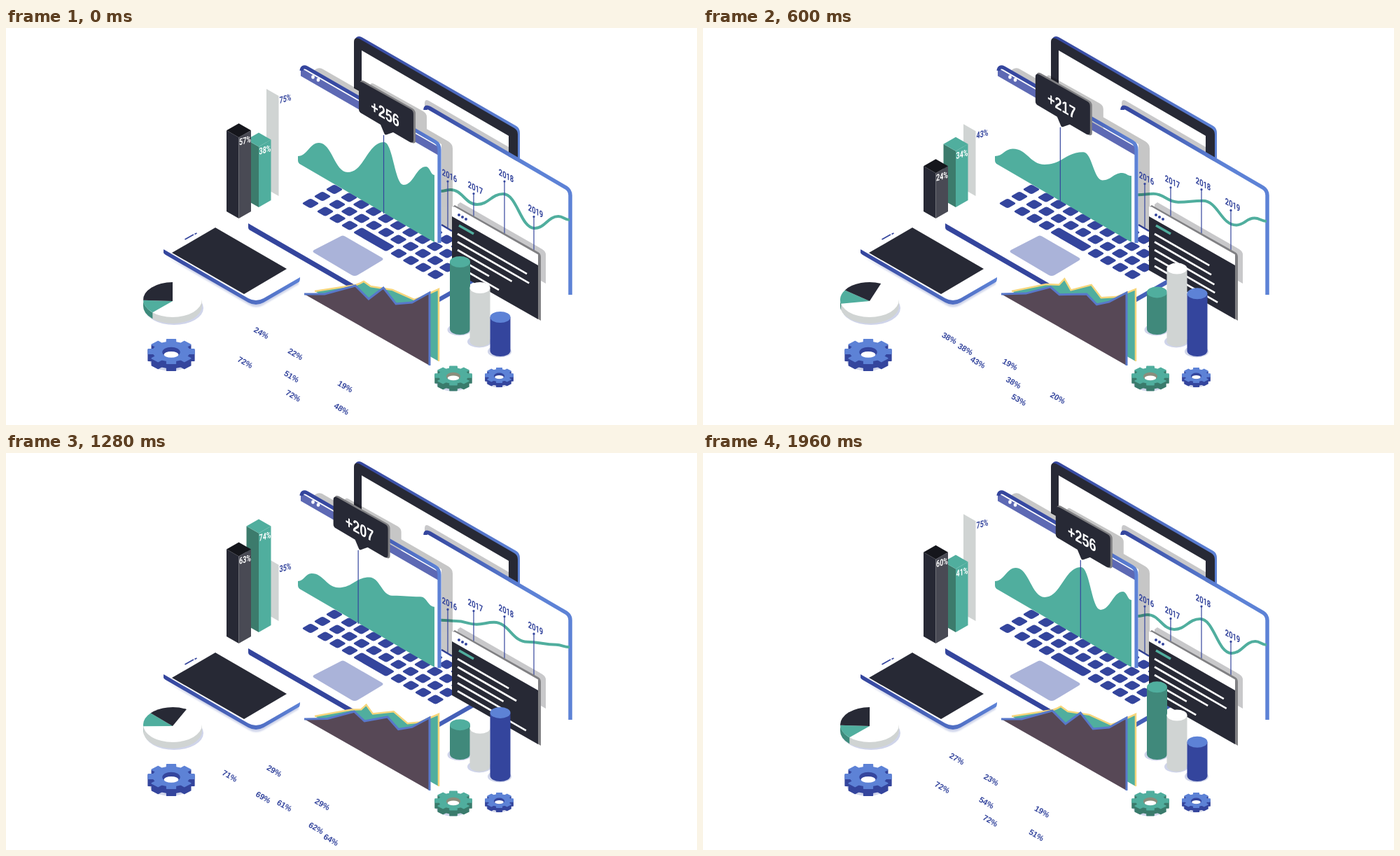
An HTML page for the animation above (2000 ms loop, 987 by 567 pixels).

```html
<!DOCTYPE html>
<html lang="en">
<head>
<meta charset="utf-8">
<title>Isometric dashboard</title>
<style>
  html, body { margin: 0; width: 100%; height: 100%; overflow: hidden; background: #fff; }
  svg { display: block; width: 100%; height: 100%; }
  text { font: 700 13px Roboto, "Liberation Sans", sans-serif; text-anchor: middle; }
  #floor text, #tipText { font-family: "Liberation Sans", Arial, sans-serif; }
  #tipText { font-size: 24px; }
</style>
</head>
<body>
<svg viewBox="0 0 987 567">
  <defs>
    <linearGradient id="edge"><stop stop-color="#34459d"/><stop offset="1" stop-color="#5d82d6"/></linearGradient>
    <linearGradient id="edgeChart" gradientUnits="userSpaceOnUse" x1="598" x2="806"><stop stop-color="#34459d"/><stop offset=".7" stop-color="#5d82d6"/></linearGradient>
    <linearGradient id="edgeLaptop" gradientUnits="userSpaceOnUse" x1="424" x2="619"><stop stop-color="#34459d"/><stop offset=".45" stop-color="#3b4fa8"/><stop offset="1" stop-color="#5d82d6"/></linearGradient>
    <filter id="soft"><feGaussianBlur stdDeviation="1.2"/></filter>
  </defs>

  <g id="monitor">
    <path fill="url(#edge)" d="M499,15Q502,10 508,13L729,140Q734,143 734,150V186H728V147L506,18Z"/>
    <path fill="#272935" fill-rule="evenodd" d="M497,20Q497,13 504,15L726,143Q731,146 731,152V190H718V154L508,32V92L497,86Z"/>
    <path fill="#c8c8ca" d="M598,108Q598,101 604,104L718,170V180L598,114Z"/>
  </g>

  <g id="lineWindow" fill="none">
    <path fill="#fff" d="M598,114L806,234V381L598,262Z"/>
    <path stroke="url(#edgeChart)" stroke-width="5.500" d="M599,117Q599,111 605,114.500L800,228Q806,232 806,239V381"/>
    <path id="trend" stroke="#50ae9e" stroke-width="4"/>
  </g>
  <path fill="#c8c8ca" d="M645,252L649,249L766,316Q771,319 771,324V365L645,293Z"/>

  <g id="laptop">
    <path fill="#34459d" d="M346,279L500,368V376L348,288.500Q346,287 346,285Z"/>
    <path fill="#4560b8" d="M600,395L672,354V361L600,402Z"/>
    <path stroke="#34459d" stroke-width="2.500" d="M622,281L637,290"/>
    <g id="keys" fill="#34459d"></g>
    <path fill="#aab3d9" d="M477,298Q481,295 485,298L537,328Q540,330 537,332L502,353Q498,355 494,353L440,321Q437,319 440,317Z"/>
  </g>

  <g opacity=".22">
    <path d="M437,62L444,58Q449,56 453,59L632,162Q638,166 638,172V290L622,281V166Z"/>
    <path id="tipShadow" d="M520,82Q521,77 526,80L596,119Q601,122 601,127V156L520,110Z"/>
  </g>
  <g id="pins" fill="#34459d" stroke="#34459d"></g>

  <g id="areaWindow">
    <path fill="#fff" d="M421,62L618,174V308L421,194Z"/>
    <path fill="#5d69b4" d="M421,57L618,170V182L421,68.500Z"/>
    <path fill="none" stroke="url(#edgeLaptop)" stroke-width="5.200" d="M422,61Q423,53.500 430,57L613,162.500Q619,166 619,174V307"/>
    <ellipse cx="438.500" cy="70" rx="2.300" ry="2.700" fill="#fff"/>
    <ellipse cx="446" cy="74" rx="2.300" ry="2.700" fill="#fff"/>
    <path id="wave" fill="#50ae9e"/>
  </g>
  <path id="stem" stroke="#34459d" stroke-width="1.200"/>
  <g id="tip">
    <path fill="#808083" d="M505,80Q506,73 512,76L581,115Q585,118 585,122V161Q585,166 580,164Z"/>
    <path fill="#272935" d="M504,81Q504,75 510,78L578,116Q582,118 582,123V160Q582,165 577,163L553,149L543,152.500Q541,153 540,150L535,138L508,122Q504,120 504,116Z"/>
    <text id="tipText" fill="#fff" transform="matrix(.75 .43 0 1 541.5 130.5)"></text>
  </g>

  <g id="codeWindow">
    <path fill="#808083" d="M637,256L641,253L760,320Q764,322 764,327V418L759,415Z"/>
    <path fill="#fff" d="M637,255L641,255.500L760,323.500V341L637,271Z"/>
    <path fill="#272935" d="M637,269L760,339V416L637,346Z"/>
    <g fill="#34459d"><circle cx="647" cy="267" r="2"/><circle cx="652" cy="270" r="2"/><circle cx="657" cy="273" r="2"/></g>
    <path stroke="#50ae9e" stroke-width="3.500" d="M647,282L668,294"/>
    <path id="code" fill="none" stroke="#fff" stroke-width="2.600"/>
  </g>

  <g id="layers">
    <path id="backLayer" fill="#50ae9e"/>
    <path id="backEdge" fill="none" stroke="#f6d67c" stroke-width="2.500"/>
    <path id="frontLayer" fill="#574856"/>
    <path id="frontEdge" fill="none" stroke="#5878ca" stroke-width="3"/>
  </g>

  <g id="cylinders"></g>
  <g id="bars"></g>

  <g id="phone">
    <path fill="#cfd4ea" filter="url(#soft)" d="M229,327L348,396Q357,401 367,396L418,366V360L357,390Z"/>
    <path fill="url(#edge)" d="M225,316V321Q225,322 228,324L346,392Q357,398 368,392L418,363Q420,362 420,356Z"/>
    <path fill="#fff" d="M225,316L346,386Q357,392 368,386L420,356L305,285Z"/>
    <path fill="#272935" d="M299,285L401,344L340,380L237,321Z"/>
    <path stroke="#34459d" stroke-width="1.800" d="M255.500,302L268,295M269.500,294.500L272.500,293"/>
  </g>

  <g id="pie">
    <ellipse cx="240" cy="400" rx="42" ry="24" fill="#cfd4ea"/>
    <path fill="#d0d4d3" d="M196,388V397a42,25 0 0 0 84,0V388Z"/>
    <path id="pieWall" fill="#3d8b7c"/>
    <ellipse cx="238" cy="388" rx="42" ry="25" fill="#fff"/>
    <path id="pieGreen" fill="#50ae9e"/>
    <path id="pieDark" fill="#272935"/>
  </g>
  <g id="gears"></g>
  <g id="floor" fill="#34459d"></g>
</svg>

<script>
const $ = id => document.getElementById(id);
const LOOP = 2000;
const BLUE = '#34459d', SKY = '#5d82d6', GREEN = '#50ae9e', GREY = '#d0d4d3';
let now = 0;

function add(parent, tag, attrs) {
  const el = document.createElementNS('http://www.w3.org/2000/svg', tag);
  for (const name in attrs) el.setAttribute(name, attrs[name]);
  return parent.appendChild(el);
}
const setPath = (id, d) => $(id).setAttribute('d', d);
const points = text => text.split(' ').map(p => p.split(',').map(Number));
const mix = (a, b, k) => a + (b - a) * k;
const blend = (from, to, k) => from.map((p, i) => [mix(p[0], to[i][0], k), mix(p[1], to[i][1], k)]);
const ease = x => x * x * (3 - 2 * x);

// Eased swing: `low` at time `start`, `high` half a period later.
function swing(start, low, high, half = 1000) {
  const x = (((now - start) / half) % 2 + 2) % 2;
  return mix(low, high, ease(x > 1 ? 2 - x : x));
}

const poly = pts => 'M' + pts.map(p => p.map(n => n.toFixed(2))).join('L');

// Smooth curve that is level at every crest and trough.
function hills(pts) {
  return 'M' + pts[0] + pts.slice(1).map(([x, y], i) => {
    const [px, py] = pts[i], reach = (x - px) * .45;
    return `C${px + reach},${py} ${x - reach},${y} ${x},${y}`;
  }).join('');
}

// Crests and troughs: high pose, low pose on the way out, low pose on the way back.
const wavePoses = [
  '417,183 447,164 488,206 540,163 568,224 600,198 612,210',
  '417,183 440,177 488,189 545,185 572,214 598,212 612,212',
  '417,183 434,174 472,189 514,181 548,199 590,207 612,222'
].map(points);
const trendPoses = [
  '621,233 635,231 673,252 710,237 755,286 789,269 805,274',
  '621,241 648,240 682,247 716,252 765,279 787,273 805,277',
  '621,240 645,242 672,243 694,243 742,266 785,275 805,278'
].map(points);
const backPoses = [
  '441,376 500,367 505,365 511,362 521,369 552,374 583,388 592,385 618,373',
  '441,376 489,366 509,367 517,358 526,375 555,366 567,385 590,384 618,373'
].map(points);
const frontPoses = [
  '426,380 455,380 499,368 518,387 539,371 557,394 580,392 605,378',
  '426,380 462,379 496,370 508,380 549,381 563,395 580,391 605,378'
].map(points);

function addKey(x, y, length = 14.5) {
  add($('keys'), 'rect', { x: -length / 2, y: -7.25, width: length, height: 14.5, rx: 3,
    transform: `matrix(.866 .5 -.866 .5 ${x} ${y})` });
}
for (let row = 0; row < 4; row++) {
  const x = 507 - 17 * row, y = 232 + 10 * row;
  addKey(x - 21, y - 11.5);
  for (let i = 0; i < 10; i++) {
    const underSpace = row === 3 && i > 2 && i < 6;
    if (!underSpace) addKey(x + 17.5 * i, y + 10 * i);
  }
}
addKey(525.5, 302, 54.5);

const pins = [
  { x: 631, foot: 287, top: 219, low: 224.5 },
  { x: 668, foot: 270, top: 236.5, low: 223 },
  { x: 712, foot: 296, top: 219, low: 237 },
  { x: 754, foot: 320, top: 269.5, low: 255.5 }
];
pins.forEach((p, i) => {
  p.line = add($('pins'), 'path', { 'stroke-width': 1.2 });
  p.dot = add($('pins'), 'circle', { cx: p.x, r: 1.6, stroke: 'none' });
  p.label = add($('pins'), 'text', { stroke: 'none' });
  p.label.textContent = 2016 + i;
});

const cylinders = [
  { x: 648.5, base: 430, top: GREEN, side: '#40897b', start: 0, low: 334, high: 401 },
  { x: 677, base: 447, top: '#fff', side: GREY, start: 500, low: 342, high: 400 },
  { x: 706, base: 461, top: SKY, side: BLUE, start: 0, low: 413, high: 361 }
];
for (const c of cylinders) {
  add($('cylinders'), 'ellipse', { cx: c.x - 1, cy: c.base + 1, rx: 17, ry: 8.5, fill: '#cfd4ea' });
  c.body = add($('cylinders'), 'path', { fill: c.side });
  c.cap = add($('cylinders'), 'ellipse', { cx: c.x, rx: 14.5, ry: 8, fill: c.top });
}

const bars = [
  { flat: true, x: 372, base: 230, start: 0, low: 75, high: 25, right: GREY, ink: BLUE },
  { x: 361, base: 256, start: 333, low: 25.9, high: 74.5, left: '#3c7b6c', right: GREEN, top: GREEN, ink: '#fff' },
  { x: 332.5, base: 272, start: 600, low: 24.4, high: 75.4, left: '#272935', right: '#494a54', top: '#15161c', ink: '#fff' }
];
for (const b of bars) {
  b.faces = ['left', 'right', 'top'].map(side => add($('bars'), 'path', { fill: b[side] || 'none' }));
  b.label = add($('bars'), 'text', { fill: b.ink });
}

const floorBars = [199, 1000, 133, 567, 1000, 0, 533].map((start, i) => (
  { start, x: 386.5 + 22.9 * i, y: 425.5 + 15.9 * i, label: add($('floor'), 'text', {}) }
));

function gearOutline(cx, cy, rx, ry) {
  const pts = [];
  for (let i = 0; i < 8; i++) {
    for (const [offset, r] of [[-14, .78], [-11, 1], [11, 1], [14, .78]]) {
      const a = (i * 45 + offset) * Math.PI / 180;
      pts.push([cx + rx * r * Math.cos(a), cy + ry * r * Math.sin(a)]);
    }
  }
  return poly(pts) + 'Z';
}
function gear(cx, cy, rx, ry, depth, top, side, bore) {
  const g = $('gears');
  const shape = { 'stroke-width': 1.5, 'stroke-linejoin': 'round' };
  add(g, 'ellipse', { cx: cx - 1, cy: cy + depth + 2, rx: rx * .9, ry: ry * .9, fill: '#cfd4ea' });
  let sides = '';
  for (let z = 1; z <= depth; z++) sides += gearOutline(cx, cy + z, rx, ry);
  add(g, 'path', { ...shape, d: sides, fill: side, stroke: side });
  add(g, 'path', { ...shape, d: gearOutline(cx, cy, rx, ry), fill: top, stroke: top });
  add(g, 'ellipse', { cx, cy: cy + 1, rx: rx * .38, ry: ry * .42, fill: bore });
  add(g, 'ellipse', { cx, cy: cy + ry * .25, rx: rx * .31, ry: ry * .25, fill: '#fff' });
}
gear(236, 462, 33.5, 17.5, 10, SKY, BLUE, BLUE);
gear(639, 496.5, 26.5, 13.5, 8, GREEN, '#3a7b6c', '#8b8d7c');
gear(704.5, 496, 20, 10.5, 6, SKY, BLUE, BLUE);

function rim(degrees) {
  const a = degrees * Math.PI / 180;
  return [238 + 42 * Math.cos(a), 388 + 25 * Math.sin(a)];
}
const slice = (from, to) => `M238,390L${rim(from)}A42,25 0 0 1 ${rim(to)}Z`;

function drawCurves(s) {
  const back = ease(Math.min(1, Math.max(0, (now - 840) / 240)));
  const morph = ([high, out, home]) => hills(blend(high, blend(out, home, back), s));
  setPath('wave', morph(wavePoses) + 'V306L421,195Q417,193 417,189Z');
  setPath('trend', morph(trendPoses));

  const r = swing(0, 0, 1, 500);
  const rear = poly(blend(...backPoses, r)), front = poly(blend(...frontPoses, r));
  setPath('backLayer', rear + 'V476L441,376Z');
  setPath('backEdge', rear + 'V476');
  setPath('frontLayer', front + 'V482L426,380Z');
  setPath('frontEdge', front + 'V482');
}

function drawTip(s) {
  const dx = -45 * s, dy = -17.5 * s;
  for (const id of ['tip', 'tipShadow']) $(id).setAttribute('transform', `translate(${dx} ${dy})`);
  $('tipText').textContent = '+' + Math.round(256 - 60 * s);
  setPath('stem', `M${539.5 + dx},${153 + dy}V${265 - 26 * s}`);
}

function drawPins(s) {
  for (const p of pins) {
    const y = mix(p.top, p.low, s);
    p.line.setAttribute('d', `M${p.x},${y}V${p.foot}`);
    p.dot.setAttribute('cy', y);
    p.label.setAttribute('transform', `matrix(.72 .38 0 1 ${p.x + 2.5} ${y - 3.5})`);
  }
}

function drawBars() {
  for (const c of cylinders) {
    const y = swing(c.start, c.low, c.high);
    c.body.setAttribute('d', `M${c.x - 14.5},${y}V${c.base}a14.5,8 0 0 0 29,0V${y}Z`);
    c.cap.setAttribute('cy', y);
  }
  for (const b of bars) {
    const value = swing(b.start, b.low, b.high), { x, base } = b;
    let tx, ty;
    if (b.flat) {
      const y = 87 + (75 - value) * 1.55;
      b.faces[1].setAttribute('d', `M${x},${y}l17.5,10V${base + 10}l-17.5,-10Z`);
      tx = 399;
      ty = y + 18.5;
    } else {
      const y = base - 47 - value * 1.545;
      b.faces[0].setAttribute('d', `M${x - 17.5},${y + 10}l17.5,10V${base}l-17.5,-10Z`);
      b.faces[1].setAttribute('d', `M${x + 17.5},${y + 10}l-17.5,10V${base}l17.5,-10Z`);
      b.faces[2].setAttribute('d', `M${x},${y}l17.5,10l-17.5,10l-17.5,-10Z`);
      tx = x + 9;
      ty = y + 29;
    }
    b.label.textContent = Math.round(value) + '%';
    b.label.setAttribute('transform', `matrix(.69 -.2 0 1.02 ${tx} ${ty})`);
  }
  for (const f of floorBars) {
    const value = swing(f.start, 19, 72);
    f.label.textContent = Math.round(value) + '%';
    f.label.setAttribute('transform', `matrix(.75 .43 -.45 .75 ${f.x - .97 * value} ${f.y + .55 * value})`);
  }
}

function drawPie(s) {
  const darkFrom = 178 + 54 * s, darkTo = 270 + 35 * s, greenFrom = 133 + 52 * s;
  setPath('pieDark', slice(darkFrom, darkTo));
  setPath('pieGreen', slice(greenFrom, darkFrom));
  const a = rim(Math.min(greenFrom, 180)), b = rim(180);
  setPath('pieWall', `M${a}v9A42,25 0 0 1 ${b[0]},${b[1] + 9}v-9Z`);
}

function drawCode() {
  const ends = [
    swing(0, 744, 712),
    swing(900, 720, 748),
    swing(1440, 709, 732),
    swing(0, 690, 736, 500),
    swing(0, 704, 752)
  ];
  setPath('code', ends.map((x, i) => {
    const y = 294 + 11.5 * i;
    return `M645,${y}L${x},${y + (x - 645) * .577}`;
  }).join(''));
}

function render(time) {
  now = time % LOOP;
  const s = swing(0, 0, 1);
  drawCurves(s);
  drawTip(s);
  drawPins(s);
  drawBars();
  drawPie(s);
  drawCode();
}

let began;
function tick(stamp) {
  began ??= stamp;
  render(stamp - began);
  requestAnimationFrame(tick);
}
render(0);
requestAnimationFrame(tick);
</script>
</body>
</html>
```
